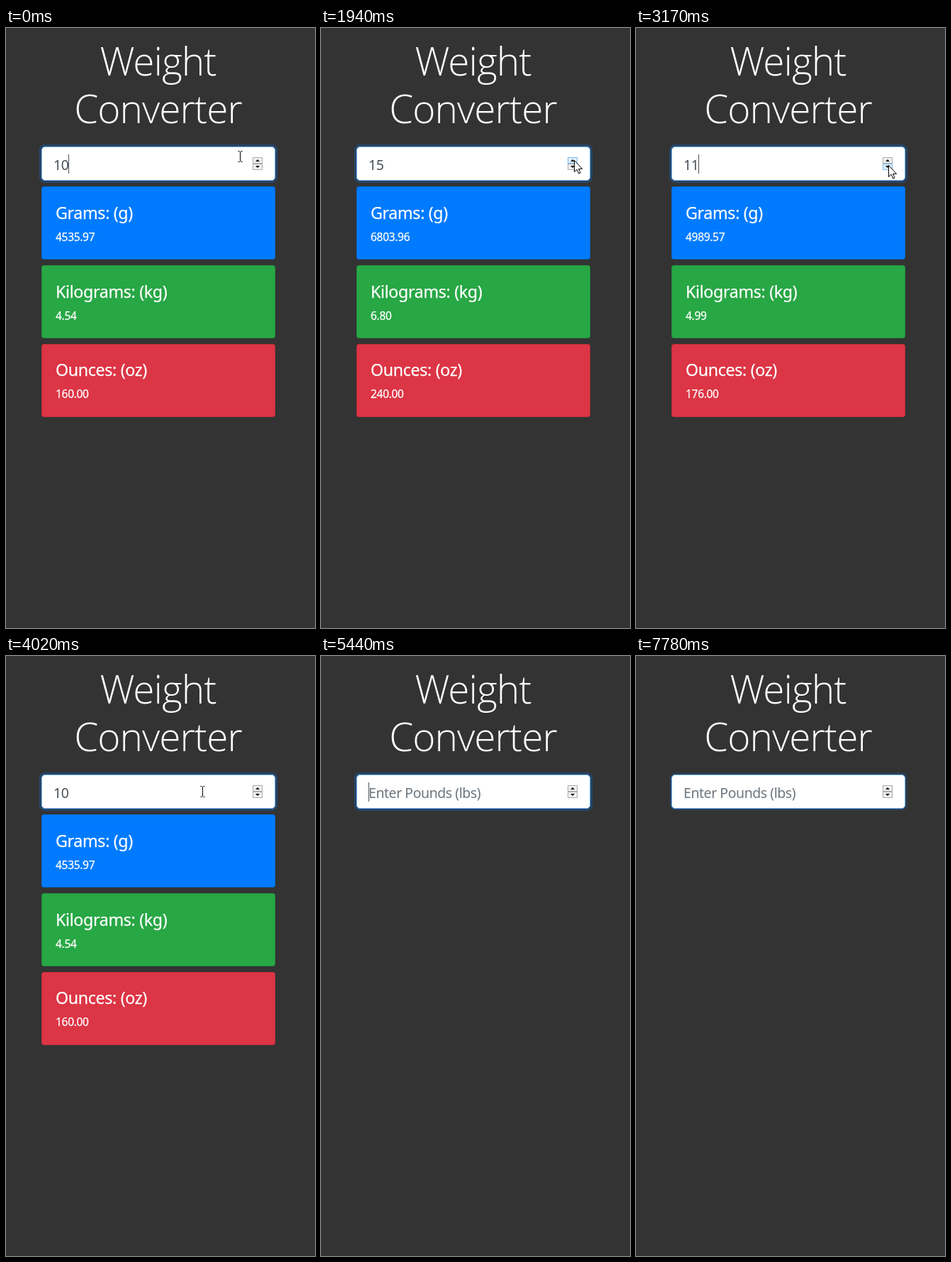
An HTML page for the animation above (7880 ms loop, 436 px wide and 845 px high).

```html
<!DOCTYPE html>
<html lang="en">
<head>
<meta charset="utf-8">
<title>Weight Converter</title>
<style>
  html, body { margin: 0; width: 100%; height: 100%; overflow: hidden; background: #333; }
  svg { display: block; width: 436px; height: 845px; }
  text { font-family: "Noto Sans", "Open Sans", sans-serif; fill: #fff; white-space: pre; }
  .title { font: 300 55px "Open Sans", "Noto Sans", sans-serif; letter-spacing: -1px; text-anchor: middle; }
  .card text { stroke: #fff; stroke-width: .25px; }
  .head { font-size: 23.2px; letter-spacing: -.33px; }
  .value { font-size: 15.6px; letter-spacing: -.35px; }
  .field { font-size: 19.5px; letter-spacing: -.45px; }
  .edge { fill: none; stroke: #000; stroke-opacity: .125; }
  .button { fill: #f0f0f0; stroke: #adadad; }
  .button.hot { fill: #dcedfb; stroke: #7fbcee; }
</style>
</head>
<body>
<svg viewBox="0 0 436 845">
  <text class="title" x="214.5" y="67">Weight</text>
  <text class="title" x="214.5" y="134">Converter</text>

  <rect id="ring" fill="#007bff"/>
  <rect x="50.5" y="167.5" width="329" height="47" rx="4.5" fill="#fff" stroke="#80bdff"/>
  <rect id="mark" y="178" height="27" fill="#3297fd"/>
  <text class="field" x="67" y="200"><tspan id="first"></tspan><tspan id="second"></tspan></text>
  <text id="hint" class="field" x="67" y="200" style="fill:#6c757d">Enter Pounds (lbs)</text>
  <rect id="caret" y="178" width="1" height="27" fill="#495057"/>

  <rect id="up" class="button" x="348.5" y="182.5" width="13" height="8"/>
  <rect id="down" class="button" x="348.5" y="191.5" width="13" height="8"/>
  <path d="M352 188h6l-3-3zM352 194h6l-3 3z"/>

  <g id="cards"></g>

  <path id="arrow" fill="#fff" stroke="#000" d="M.5 .5V16.6L4.2 13.2 6.6 19 9 18 6.6 12.4H11.6Z"/>
  <path id="beam" fill="none" stroke="#000" d="M-3 -7.5H-1M1 -7.5H3M-3 7.5H-1M1 7.5H3M0 -7V7"/>
</svg>
<script>
const LOOP = 7880, CLEAR = 5440, BLUR = 7780, DRAG_END = 4690;
const $ = id => document.getElementById(id);

const units = [
  ["Grams: (g)", "#007bff", n => n / 0.0022046],
  ["Kilograms: (kg)", "#28a745", n => n / 2.2046],
  ["Ounces: (oz)", "#dc3545", n => n * 16]
];

$("cards").innerHTML = units.map(([name, color], i) => {
  const top = 223.4 + 110.6 * i, y = Math.round(top), line = Math.round(top + 45.7);
  return `<g class="card">
    <rect x="50" y="${y}" width="330" height="103" rx="4" fill="${color}"/>
    <rect class="edge" x="50.5" y="${y + .5}" width="329" height="102" rx="3.5"/>
    <text class="head" x="70" y="${line}">${name}</text>
    <text class="value" x="70" y="${line + 31}"></text>
  </g>`;
}).join("");
const values = document.querySelectorAll(".value");

// Times of the clicks on each spinner button.
const ups = [600, 840, 980, 1210, 1550];
const downs = [2400, 2600, 2770, 3170, 3500];
const clicks = [...ups, ...downs];

// Pointer moves: start, end, x, y.
const moves = [
  [40, 110, 360, 179],
  [280, 290, 361, 188],
  [490, 630, 357, 186],
  [1940, 2150, 356, 193],
  [3650, 4350, 211, 190],
  [4450, DRAG_END, 14, 191]
];

const countTo = (times, t) => times.filter(s => s <= t).length;
const poundsAt = t => 10 + countTo(ups, t) - countTo(downs, t);

function pointAt(t) {
  let x = 330, y = 181;
  for (const [start, end, toX, toY] of moves) {
    const k = Math.min(1, Math.max(0, (t - start) / (end - start)));
    const ease = k * k * (3 - 2 * k);
    x += (toX - x) * ease;
    y += (toY - y) * ease;
  }
  return [Math.round(x), Math.round(y)];
}

// Every blink flips the caret; a click shows it without resetting the timer.
function caretAt(t) {
  if (t >= CLEAR) return Math.floor((t - 4970) / 530) % 2 === 0;
  const clicked = (a, b) => clicks.some(c => c > a && c <= b);
  let on = true, last = 0;
  for (let blink = 70; blink <= t; blink += 522) {
    on = !(on || clicked(last, blink));
    last = blink;
  }
  return on || clicked(last, t);
}

function set(id, attrs) {
  for (const key in attrs) $(id).setAttribute(key, attrs[key]);
}
const show = (id, on) => set(id, { visibility: on ? "visible" : "hidden" });

function drawPointer(t, [x, y]) {
  const visible = t < DRAG_END, onSpinner = x >= 346;
  show("arrow", visible && onSpinner);
  show("beam", visible && !onSpinner);
  set("arrow", { transform: `translate(${x} ${y})` });
  set("beam", { transform: `translate(${x + .5} ${y})` });
  const over = top => x >= 348 && x < 362 && y >= top && y < top + 9;
  $("up").classList.toggle("hot", over(182));
  $("down").classList.toggle("hot", over(191));
}

function drawField(t, x, pounds) {
  const empty = t >= CLEAR;
  // The drag selects a digit once it passes the digit's middle.
  const start = empty || x > 83 ? 88 : x > 72 ? 78 : 67;
  set("mark", { x: start, width: 88 - start });
  [..."" + pounds].forEach((digit, i) => {
    const id = ["first", "second"][i];
    $(id).textContent = empty ? "" : digit;
    set(id, { fill: start <= 67 + 11 * i ? "#fff" : "#495057" });
  });
  show("hint", empty);
  set("caret", { x: empty ? 67 : 88 });
  show("caret", caretAt(t) && (empty || start === 88));
}

function drawRing(spread, alpha) {
  set("ring", {
    x: 50 - spread, y: 167 - spread, width: 330 + 2 * spread, height: 48 + 2 * spread,
    rx: 5 + spread, "fill-opacity": alpha
  });
}

function draw(t) {
  const point = pointAt(t), pounds = poundsAt(t), focused = t < BLUR;
  drawPointer(t, point);
  drawField(t, point[0], pounds);
  drawRing(focused ? 3.2 : 2.4, focused ? .25 : .2);
  show("cards", t < CLEAR);
  units.forEach(([, , convert], i) => { values[i].textContent = convert(pounds).toFixed(2); });
}

const begin = performance.now();
function tick() {
  draw((performance.now() - begin) % LOOP);
  requestAnimationFrame(tick);
}
tick();
</script>
</body>
</html>
```
